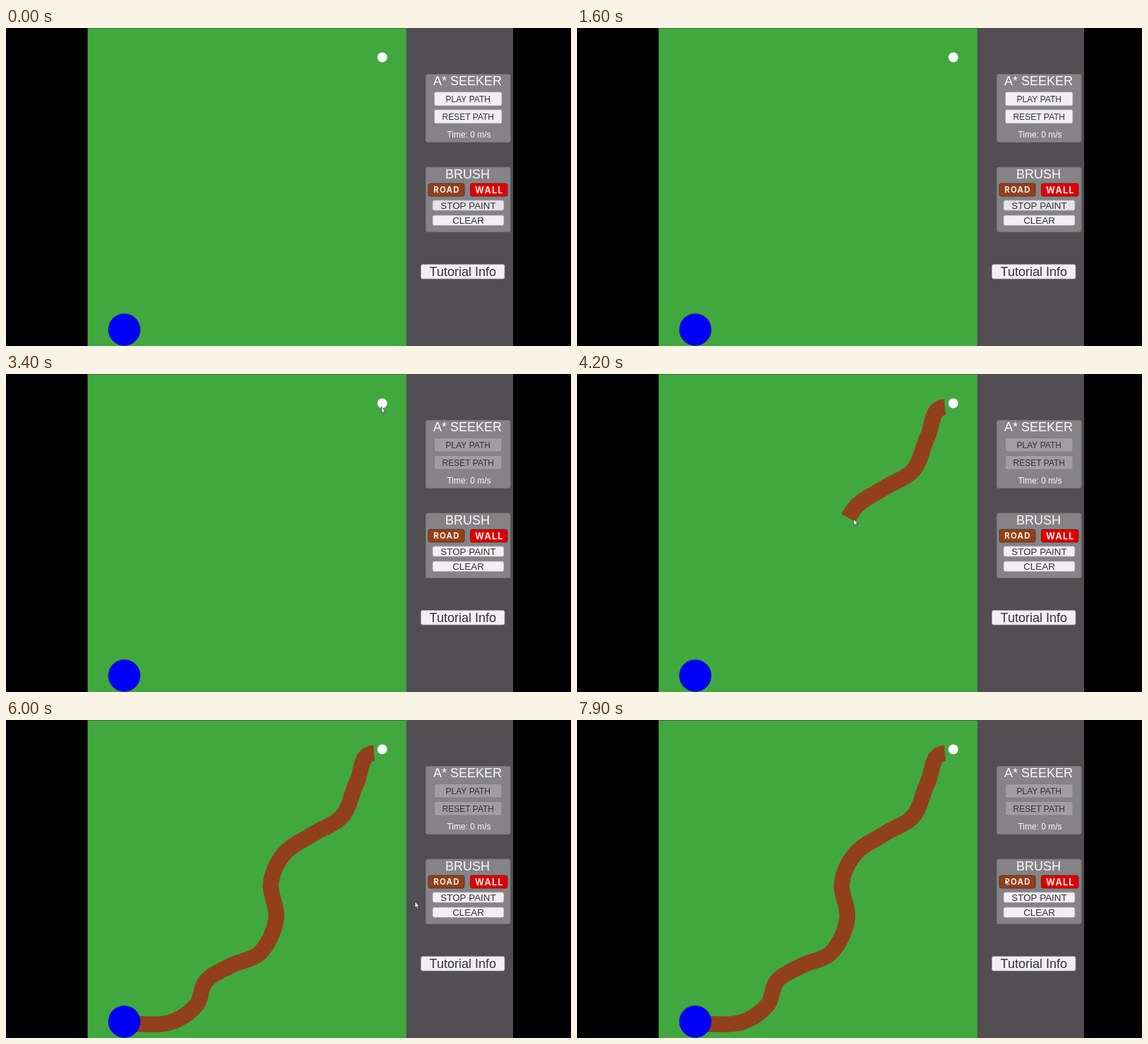
An HTML page with a canvas that plays this animation: 800 by 450 pixels, repeating every 8000 ms.

```html
<!DOCTYPE html>
<html>
<head>
<meta charset="utf-8">
<title>Path painter</title>
<style>
html, body { margin: 0; width: 100%; height: 100%; overflow: hidden; background: #000; }
canvas { display: block; }
</style>
</head>
<body>
<canvas id="stage" width="800" height="450"></canvas>
<script>
const ctx = document.getElementById('stage').getContext('2d');
const LOOP = 8000, STEP = 100;
const SANS = '"Liberation Sans", Arial, sans-serif';
const BOLD = 'Inter, "Open Sans", sans-serif';
const LIGHT = '#f1eff3', INK = '#323232', WHITE = '#fafafa', BROWN = '#92401b';

// the brush passes one knot every KNOT_MS
const PAINT_ON = 2500, DRAW_START = 3620, KNOT_MS = 132, DRAW_END = 5200;

const knots = [
  [521, 47], [496.5, 88.5], [476.5, 135.5], [434.5, 161.5], [394.5, 188.5],
  [375, 230.5], [382.5, 281.5], [360.5, 328.5], [318.5, 347.5], [283.5, 369],
  [268.5, 404.5], [230, 428.5], [172, 429.5]
];
const LAST = knots.length - 1;
const LEAD_IN = [616, 88]; // makes the road start level

const entry = [640, 452], roadButton = [606, 224.5], goal = [531.5, 46.5], aside = [579, 257];

const clamp = (v, lo, hi) => Math.min(hi, Math.max(lo, v));
const knot = i => i < 0 ? LEAD_IN : knots[Math.min(i, LAST)];

// Catmull-Rom point at u, counted in knots
function roadAt(u) {
  const i = Math.min(Math.floor(u), LAST - 1), k = u - i;
  const [a, b, c, d] = [knot(i - 1), knot(i), knot(i + 1), knot(i + 2)];
  return [0, 1].map(j => b[j] + 0.5 * k * (c[j] - a[j] +
    k * (2 * a[j] - 5 * b[j] + 4 * c[j] - d[j] + k * (3 * (b[j] - c[j]) + d[j] - a[j]))));
}

function glide(a, b, t, from, to) {
  const k = clamp((t - from) / (to - from), 0, 1);
  const e = k * k * (3 - 2 * k);
  return a.map((v, j) => v + (b[j] - v) * e);
}

function brushTip(u) {
  const [x, y] = roadAt(u);
  return [x + 7.5, y + 1.8];
}

function pointerAt(t, u) {
  if (t < PAINT_ON) return glide(entry, roadButton, t, 2000, 2400);
  if (t < DRAW_START) return glide(roadButton, goal, t, 2600, 3300);
  if (t < DRAW_END) return brushTip(u);
  if (t < 6100) return glide(brushTip(LAST), aside, t, DRAW_END, 6000);
  return glide(aside, roadButton, t, 6100, 6600);
}

function rect(x, y, w, h, color) {
  ctx.fillStyle = color;
  ctx.fillRect(x, y, w, h);
}

function box(x, y, w, h, fill, edge) {
  ctx.beginPath();
  ctx.roundRect(x, y, w, h, 2.5);
  ctx.fillStyle = fill;
  ctx.fill();
  ctx.strokeStyle = edge;
  ctx.lineWidth = 0.8;
  ctx.stroke();
}

function label(str, x, y, size, color, font = SANS, weight = 400, gap = 0) {
  ctx.font = `${weight} ${size}px ${font}`;
  ctx.letterSpacing = gap + 'px';
  ctx.textAlign = 'center';
  ctx.fillStyle = color;
  ctx.fillText(str, x + gap / 2, y);
}

// button with its caption centred on the capitals
function button(str, x, y, w, h, size, fill = LIGHT, edge = '#9d9b9f') {
  box(x, y, w, h, fill, edge);
  label(str, x + w / 2, y + h / 2 + size * 0.37, size, INK);
}

function brushButton(str, x, w, size, fill, edge) {
  box(x, 220, w, 18, fill, edge);
  label(str, x + w / 2, 229 + size * 0.364, size, '#f8ece8', BOLD, 700, size / 10);
}

function group(title, y, h) {
  box(594.5, y, 119.5, h, '#858386', '#777578');
  label(title, 653.6, y + 15.7, 18, WHITE);
}

function disc(x, y, r, color) {
  ctx.beginPath();
  ctx.arc(x, y, r, 0, Math.PI * 2);
  ctx.fillStyle = color;
  ctx.fill();
}

function drawRoad(u) {
  if (u <= 0) return;
  ctx.beginPath();
  for (let v = 0; v < u; v += 0.06) ctx.lineTo(...roadAt(v));
  ctx.lineTo(...roadAt(u));
  ctx.strokeStyle = BROWN;
  ctx.lineWidth = 22.5;
  ctx.lineJoin = 'round';
  ctx.stroke();
}

function drawField(u) {
  rect(115.6, 0, 451.4, 450, '#41a840');
  rect(115.6, 0, 451.4, 1, '#3a6b3a');
  drawRoad(u);
  disc(167.5, 426.8, 22.6, '#0000f8');
  ctx.setLineDash([1.5, 1.5]);
  ctx.strokeStyle = '#00106a';
  ctx.lineWidth = 0.8;
  ctx.stroke();
  ctx.setLineDash([]);
  disc(532.8, 41.5, 6.9, '#fff');
}

function drawPanel(painting) {
  const fill = painting ? '#a09ea1' : LIGHT;
  const edge = painting ? '#7d7b7e' : '#a09ea2';
  rect(566.8, 0, 151.2, 450, '#514f51');

  group('A* SEEKER', 65.5, 96);
  button('PLAY PATH', 606.5, 90.5, 95.5, 19.5, 12, fill, edge);
  button('RESET PATH', 606.5, 115.5, 95.5, 19.5, 12, fill, edge);
  label('Time: 0 m/s', 655.5, 155, 12, WHITE);

  group('BRUSH', 197, 91.5);
  brushButton('ROAD', 598, 51, 11.5, BROWN, '#4c2a1e');
  brushButton('WALL', 657.5, 52.5, 12.5, '#e00000', '#6a1414');
  button('STOP PAINT', 604, 243.8, 101, 14.5, 13.4, painting ? LIGHT : '#e6e4e8');
  button('CLEAR', 604, 265, 101, 14.5, 13.4);

  button('Tutorial Info', 587.5, 334.5, 118.5, 20.5, 18);
}

function drawPointer(x, y) {
  ctx.beginPath();
  ctx.moveTo(x, y);
  for (const [dx, dy] of [[0, 8.6], [2, 6.9], [3.4, 10], [4.9, 9.3], [3.6, 6.4], [6.2, 6.2]]) {
    ctx.lineTo(x + dx, y + dy);
  }
  ctx.closePath();
  ctx.fillStyle = '#fff';
  ctx.fill();
  ctx.strokeStyle = '#222';
  ctx.lineWidth = 0.7;
  ctx.lineJoin = 'miter';
  ctx.stroke();
}

function render(t) {
  const u = clamp((t - DRAW_START) / KNOT_MS, 0, LAST);
  rect(0, 0, 800, 450, '#000');
  drawField(u);
  drawPanel(t >= PAINT_ON);
  if (t >= 2000) drawPointer(...pointerAt(t, u));
}

const begin = performance.now();
function tick() {
  const t = (performance.now() - begin) % LOOP;
  render(Math.floor(t / STEP) * STEP);
  requestAnimationFrame(tick);
}
tick();
</script>
</body>
</html>
```
